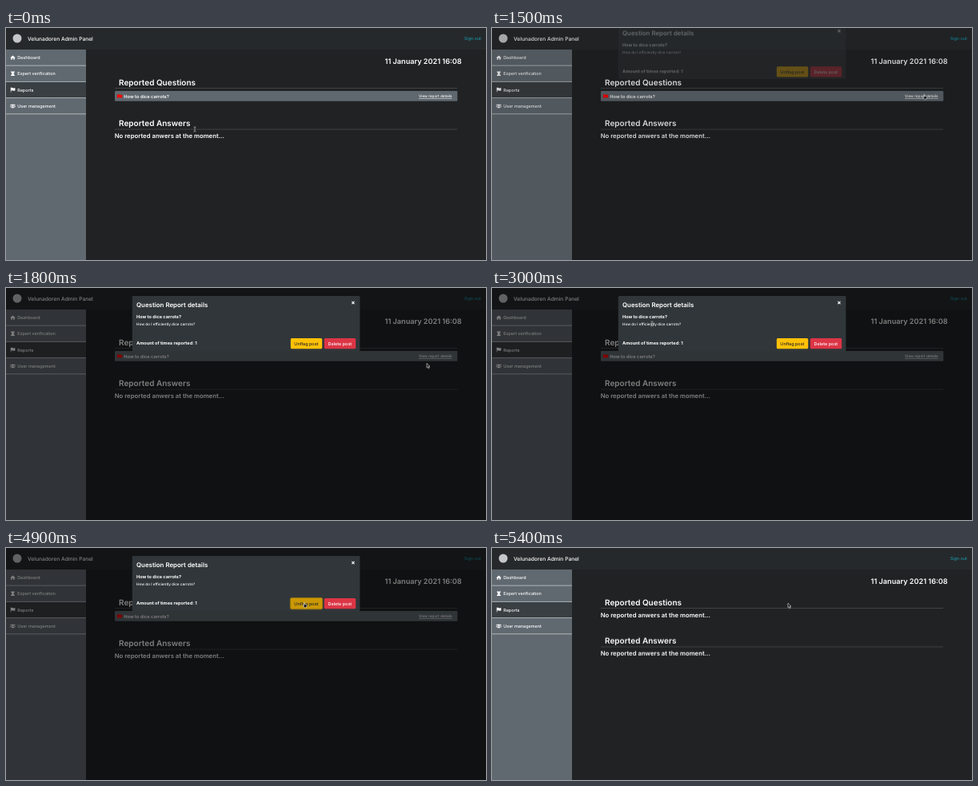
Animation of 600x291 px, one loop 6.4 s. Source, as an HTML page:

```html
<!DOCTYPE html>
<html lang="en">
<head>
<meta charset="utf-8">
<title>Admin panel</title>
<style>
html, body { margin: 0; width: 100%; height: 100%; overflow: hidden; background: #212224; }
svg { display: block; width: 100%; height: 100%; }
text { font: 500 5.45px Inter, Roboto, sans-serif; fill: #fff; text-rendering: geometricPrecision; }
text.brand { font-size: 6.67px; }
text.heading { font-size: 10px; font-weight: 600; }
text.date { font-size: 9.1px; font-weight: 600; text-anchor: end; }
text.empty { font-size: 7.74px; font-weight: 600; }
text.item { font-size: 5.7px; font-weight: 600; }
text.link { font-size: 4.64px; text-decoration: underline; }
text.signout { font-weight: 400; fill: #17a2b8; }
text.title { font-size: 7.9px; font-weight: 600; }
text.strong { font-size: 5.6px; font-weight: 700; }
text.small { font-size: 4.68px; }
text.button { text-anchor: middle; }
.rule { stroke: #505254; stroke-width: .7; }
.divider { stroke: #d5d8da; stroke-width: .7; }

/* One loop is 6400 ms, so 100 ms is 1.5625%. */
.anim { animation: 6400ms step-end infinite; }
#move { animation-name: move; }
#ibeam { animation-name: ibeam; }
#arrow { animation-name: arrow; }
#hand { animation-name: hand; }
#backdrop { animation-name: fade; }
#modal { animation-name: fade, slide; }
#hover { animation-name: hover; }
#answers { animation-name: lift; }
.before { animation-name: before; }
.after { animation-name: after; }

@keyframes fade {
  0% { opacity: 0; }
  23.4375% { opacity: .32; }
  25%, 73% { opacity: 1; }
  78.125%, 100% { opacity: 0; }
}
@keyframes slide {
  0%, 23.4375% { transform: translateY(-14.8px); }
  25% { transform: translateY(-6.6px); }
  26.5625% { transform: translateY(-1px); }
  28.125%, 100% { transform: none; }
}
@keyframes hover { 0%, 100% { opacity: 0; } 68.75% { opacity: 1; } }
@keyframes lift { 0% { transform: none; } 78.125%, 100% { transform: translateY(-3.2px); } }
@keyframes before { 0% { opacity: 1; } 78.125%, 100% { opacity: 0; } }
@keyframes after { 0% { opacity: 0; } 78.125%, 100% { opacity: 1; } }
@keyframes ibeam {
  0%, 42.1875% { opacity: 1; }
  6.25%, 57.8125%, 100% { opacity: 0; }
}
@keyframes arrow {
  0%, 14.0625%, 42.1875%, 68.75% { opacity: 0; }
  6.25%, 26.5625%, 57.8125%, 82.8125%, 100% { opacity: 1; }
}
@keyframes hand {
  0%, 26.5625%, 82.8125%, 100% { opacity: 0; }
  14.0625%, 68.75% { opacity: 1; }
}
@keyframes move {
  0% { transform: translate(236px, 127px); }
  3.125% { transform: translate(228px, 125px); animation-timing-function: steps(2); }
  6.25% { transform: translate(184px, 113px); animation-timing-function: steps(2); }
  9.375% { transform: translate(300px, 97px); animation-timing-function: steps(2); }
  12.5% { transform: translate(503px, 86px); animation-timing-function: steps(4); }
  18.75% { transform: translate(540.5px, 83.2px); }
  25% { transform: translate(540.5px, 83.2px); animation-timing-function: steps(2); }
  28.125% { transform: translate(526px, 94.5px); animation-timing-function: steps(4); }
  34.375% { transform: translate(356px, 117px); animation-timing-function: steps(6); }
  43.75% { transform: translate(200px, 45px); }
  46.875% { transform: translate(200px, 45px); animation-timing-function: steps(2); }
  50% { transform: translate(195px, 45px); animation-timing-function: steps(3); }
  54.6875% { transform: translate(244px, 46px); }
  56.25% { transform: translate(244px, 46px); animation-timing-function: steps(3); }
  60.9375% { transform: translate(242.5px, 52px); animation-timing-function: steps(4); }
  67.1875% { transform: translate(366px, 67px); animation-timing-function: steps(4); }
  73.4375% { transform: translate(373px, 68.5px); }
  81.25% { transform: translate(373px, 68.5px); animation-timing-function: steps(2); }
  84.375%, 100% { transform: translate(370px, 69.3px); }
}
</style>
</head>
<body>
<svg viewBox="0 0 600 291" preserveAspectRatio="none">
  <rect width="600" height="291" fill="#212224"/>

  <!-- Header -->
  <rect width="600" height="27" fill="#26292b"/>
  <circle cx="14" cy="13" r="5.5" fill="#c4c6c8"/>
  <text class="brand" x="27" y="15.6">Velunadoren Admin Panel</text>
  <text class="signout" x="572.7" y="15.2">Sign out</text>

  <!-- Sidebar -->
  <rect y="27" width="100" height="264" fill="#606970"/>
  <rect y="67.4" width="100" height="20.2" fill="#3a3f43"/>
  <path class="divider" d="M0 47.1H100M0 67.4H100M0 87.6H100M0 107.8H100"/>
  <g fill="#fff">
    <path d="M5.4 37.2 8.5 34.4 11.6 37.2 11.2 37.7 10.7 37.3V39.7H9.2V37.7H7.8V39.7H6.3V37.3L5.8 37.7Z"/>
    <path d="M6 54.4H11V55.2H10.5Q10.5 56.5 9.3 57.2Q10.5 58 10.5 59.2H11V60H6V59.2H6.5Q6.5 58 7.7 57.2Q6.5 56.5 6.5 55.2H6Z"/>
    <path d="M5.8 74.6H6.4V75.1Q7.8 74.6 8.8 75.2T11.4 75.1V78.4Q10.2 79 8.8 78.5T6.4 78.5V80.4H5.8Z"/>
    <circle cx="8.5" cy="96.7" r="1.3"/>
    <circle cx="6.2" cy="96.6" r=".8"/>
    <circle cx="10.8" cy="96.6" r=".8"/>
    <path d="M6.6 100.2Q6.6 98.3 8.5 98.3T10.4 100.2ZM5.1 99.2Q5.1 97.7 6.9 97.8L6.3 99.2ZM11.9 99.2Q11.9 97.7 10.1 97.8L10.7 99.2Z"/>
  </g>
  <text x="14.2" y="39.1">Dashboard</text>
  <text x="14.2" y="59.3">Expert verification</text>
  <text x="14.2" y="79.5">Reports</text>
  <text x="14.2" y="99.8">User management</text>

  <!-- Content -->
  <text class="date" x="569.7" y="44.7">11 January 2021 16:08</text>
  <text class="heading" x="141" y="71.8">Reported Questions</text>
  <path class="rule" d="M136 75.5H564"/>
  <g class="anim before">
    <rect x="136" y="79.1" width="428.3" height="12.7" rx="1" fill="#5f686f"/>
    <path d="M139 83.2H139.7V83.6Q141.2 83 142.3 83.6T145.2 83.5V87.2Q143.7 87.9 142.3 87.3T139.7 87.3V88.8H139Z" fill="#f00"/>
    <text class="item" x="147.3" y="87.7">How to dice carrots?</text>
    <text class="link" x="516" y="87.2">View report details</text>
  </g>
  <text class="empty anim after" x="135.7" y="86.9">No reported anwers at the moment...</text>
  <g id="answers" class="anim">
    <text class="heading" x="141" y="123">Reported Answers</text>
    <path class="rule" d="M136 127.1H564"/>
    <text class="empty" x="135.7" y="138.2">No reported anwers at the moment...</text>
  </g>

  <rect id="backdrop" class="anim" width="600" height="291" fill-opacity=".5"/>

  <!-- Report dialog -->
  <g id="modal" class="anim">
    <rect x="157.8" y="10" width="284.6" height="69" rx="1" fill="#30363a"/>
    <text class="title" x="163" y="23.9">Question Report details</text>
    <path d="M432.3 16.9 435.5 20.1M435.5 16.9 432.3 20.1" stroke="#fff" stroke-width="1.1"/>
    <text class="strong" x="163" y="38.1">How to dice carrots?</text>
    <text class="small" x="163" y="46.7">How do I efficiently dice carrots?</text>
    <text class="strong" x="163" y="70.7">Amount of times reported: 1</text>
    <rect x="355.8" y="62.9" width="39.4" height="13.4" rx="1.6" fill="#ffc107"/>
    <rect id="hover" class="anim" x="355.3" y="62.4" width="40.4" height="14.4" rx="2" fill="#cb9805" stroke="#8d7016"/>
    <text class="button" x="375.4" y="71.6" style="fill:#212529">Unflag post</text>
    <rect x="397.8" y="62.9" width="39.4" height="13.4" rx="1.6" fill="#dc3545"/>
    <text class="button" x="417.4" y="71.6">Delete post</text>
  </g>

  <!-- Pointer -->
  <g id="move" class="anim">
    <path id="ibeam" class="anim" d="M-1.5-3Q0-3 0-2.2Q0-3 1.5-3M0-2.2V2.2M-1.5 3Q0 3 0 2.2Q0 3 1.5 3" fill="none" stroke="#c4c4c4" stroke-width=".7"/>
    <path id="arrow" class="anim" d="M0 0V5.4L1.3 4.3 2.2 6.3 3.1 5.9 2.2 4H3.9Z" stroke="#fff" stroke-width=".6"/>
    <path id="hand" class="anim" d="M-.5 .4Q0-.3 .5 .4V2.2L2.8 2.8Q3.3 3 3.1 4L2.5 6H-.4L-2 3.8Q-1.6 3-.5 4Z" stroke="#fff" stroke-width=".6"/>
  </g>
</svg>
</body>
</html>
```
